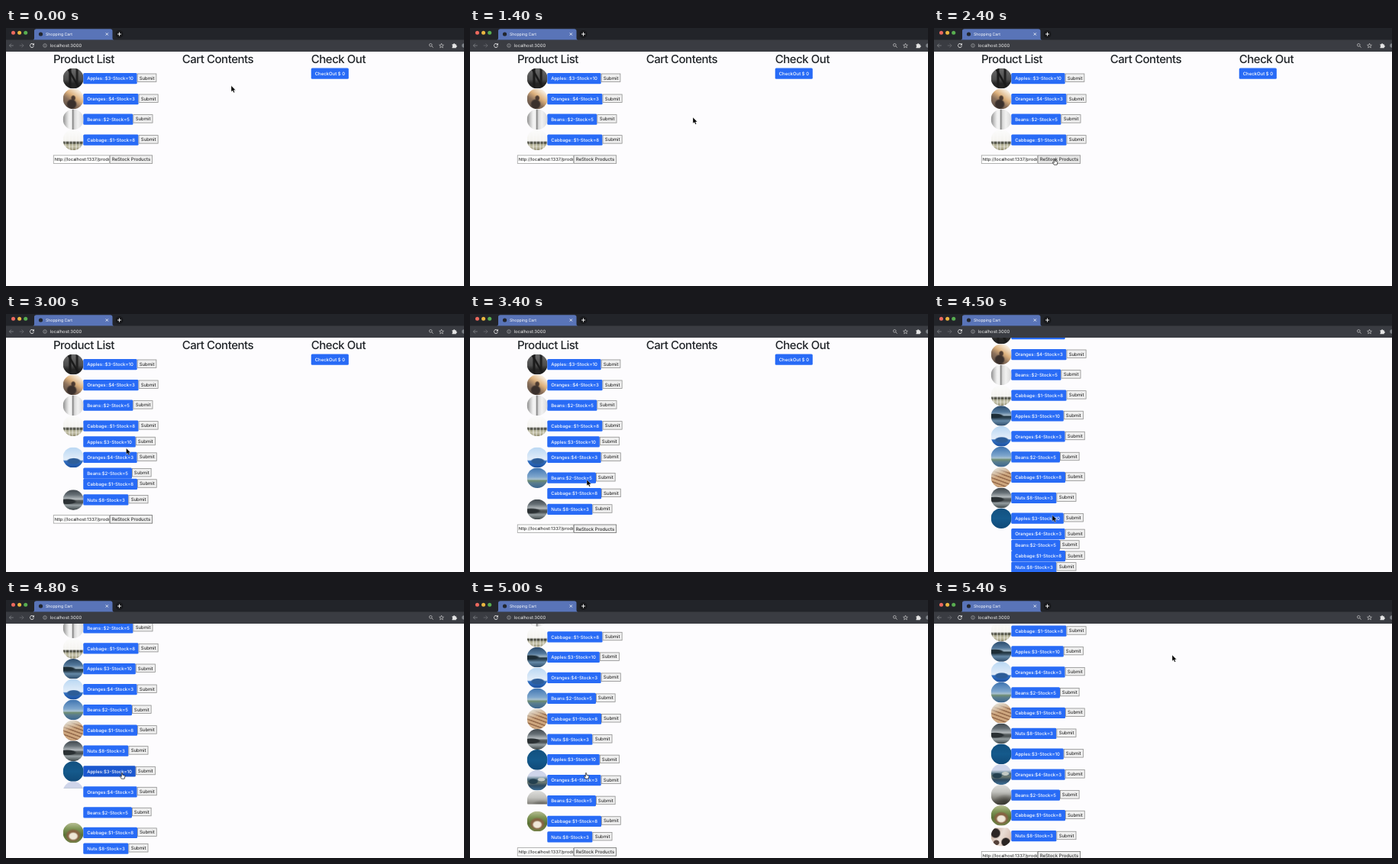
Recreate the animation shown at these times as an HTML page. Size 600x338 px, loop 5.5 s.

```html
<!DOCTYPE html>
<html lang="en">
<head>
<meta charset="utf-8">
<title>Shopping Cart</title>
<style>
  html, body { margin: 0; width: 100%; height: 100%; overflow: hidden; }
  body { position: relative; background: #fdfcfe; }
  #view { position: absolute; left: 0; top: 31px; width: 600px; height: 307px; overflow: hidden; }
  /* the page is laid out at full size and shown at 37.5% */
  #page { position: absolute; left: 0; top: -31px; width: 1600px; height: 1400px; transform-origin: 0 0;
    font: 16px/1 Inter, "Open Sans", sans-serif; color: #212529; white-space: nowrap; text-rendering: geometricPrecision; }
  h1 { position: absolute; top: 85px; margin: 0; font-size: 40px; line-height: 48px; font-weight: 500; letter-spacing: -1.25px; }
  .row { position: absolute; left: 199px; padding-left: 71px; display: flex; align-items: center; }
  .photo { position: absolute; left: 0; top: 0; width: 71.5px; height: 71.5px; border-radius: 50%; }
  .buy { height: 38px; line-height: 38px; padding: 0 13px; border-radius: 4px; background: #286bf6; color: #fff; font-weight: 500; }
  .buy.hover { background: #1b57cf; }
  .gray { box-sizing: border-box; height: 30px; line-height: 26px; padding: 0 6px; border: 2px solid #8a8a8a; background: #efefef; color: #111; }
  .row .gray { position: relative; top: -2px; }
  #checkout { position: absolute; left: 1066px; top: 140px; }
  #form { position: absolute; left: 165px; display: flex; }
  #url { box-sizing: border-box; width: 197px; height: 30px; line-height: 26px; padding-left: 2px; border: 2px solid #999; background: #fff; color: #111; font-size: 15.4px; overflow: hidden; }
  #restock.hover { background: #e5e5e5; }
  #restock.focus { border-color: #666; }
  svg { position: absolute; left: 0; top: 0; }
  svg text { font-family: Inter, "Open Sans", sans-serif; text-rendering: geometricPrecision; }
</style>
</head>
<body>
<div id="view">
  <div id="page">
    <h1 style="left:165px">Product List</h1>
    <h1 style="left:615px">Cart Contents</h1>
    <h1 style="left:1066px">Check Out</h1>
    <div id="checkout" class="buy">CheckOut $ 0</div>
    <div id="form">
      <div id="url">http://localhost:1337/products</div>
      <div id="restock" class="gray">ReStock Products</div>
    </div>
  </div>
</div>

<svg width="600" height="338" viewBox="0 0 600 338" fill="none">
  <!-- tab strip -->
  <path fill="#222429" d="M0 0H600V16H0Z"/>
  <path fill="#3a3c42" d="M0 15.4H600V31H0Z"/>
  <circle cx="9.5" cy="6.2" r="2.5" fill="#ec695e"/>
  <circle cx="17.6" cy="6.2" r="2.5" fill="#eab640"/>
  <circle cx="25.7" cy="6.2" r="2.5" fill="#58ae50"/>
  <path fill="#5974b8" d="M35 15.5Q37 15.5 37 13.5V4Q37 1.2 40 1.2H136.5Q139.5 1.2 139.5 4V13.5Q139.5 15.5 141.5 15.5Z"/>
  <circle cx="45.5" cy="8" r="2.6" fill="#22262e"/>
  <text x="52" y="10" font-size="5.15" fill="#fff">Shopping Cart</text>
  <path stroke="#fff" stroke-width=".8" d="M130.7 6.4l3.2 3.2m0-3.2l-3.2 3.2"/>
  <circle cx="148.5" cy="8" r="5" fill="#18191c"/>
  <path stroke="#fff" stroke-width=".9" d="M146 8h5m-2.5-2.5v5"/>
  <!-- toolbar -->
  <path stroke="#85878b" stroke-width=".8" d="M9.8 23H4.4m2.5-2.5L4.4 23l2.5 2.5"/>
  <path stroke="#6b6d71" stroke-width=".8" d="M17.7 23h5.4m-2.5-2.5l2.5 2.5-2.5 2.5"/>
  <path stroke="#eee" stroke-width=".9" d="M35.9 21.4a2.5 2.5 0 1 0 .5 2.2"/>
  <path fill="#eee" d="M36.9 19.8v2.7h-2.7z"/>
  <circle cx="51" cy="23" r="2.3" stroke="#b5b7bb" stroke-width=".6"/>
  <path stroke="#b5b7bb" stroke-width=".6" d="M51 22.7v1.5m0-2.7v.6"/>
  <text x="57.5" y="25.1" font-size="5.9" fill="#f1f1f1">localhost:3000</text>
  <circle cx="556.3" cy="22.3" r="1.8" stroke="#ccc" stroke-width=".7"/>
  <path stroke="#ccc" stroke-width=".8" d="M557.6 23.6l2 2"/>
  <path stroke="#ddd" stroke-width=".6" d="M570.5 20.2l.8 2 2.1.1-1.6 1.4.5 2.1-1.8-1.2-1.8 1.2.5-2.1-1.6-1.4 2.1-.1z"/>
  <path fill="#e4e4e4" d="M584.5 21.3h1.5a1.1 1.1 0 0 1 2.2 0h1.5v1.5a1.1 1.1 0 0 1 0 2.2v1.3h-5.2v-1.5a1.1 1.1 0 0 0 0-2z"/>
  <circle cx="600" cy="23" r="2.8" fill="#7d8187"/>
  <!-- pointer, drawn with its tip at 0,0 -->
  <g id="cursor" stroke-linejoin="round">
    <path id="arrow" fill="#000" stroke="#fff" stroke-width=".4" d="M0 0V8L1.9 6.4 3.2 9.3 4.6 8.7 3.4 5.9H5.8Z"/>
    <path id="hand" fill="#fff" stroke="#111" stroke-width=".7" d="M-.7.8Q0-.3.7.8V3.2L3.4 3.9Q4 4.2 3.8 5.2L3.2 8.2H-.7L-2.6 5.3Q-2.7 4.4-1.7 4.7L-.7 5.6Z"/>
  </g>
</svg>

<script>
const LOOP = 5500, STEP = 100;
const ZOOM = .375, TOP = 140.3, TALL = 71.6, SHORT = 38.4;
const FIRST_ADD = 2600, SECOND_ADD = 4300;

const down = stops => `linear-gradient(${stops})`;
const across = stops => `linear-gradient(90deg,${stops})`;
const blob = (size, at, color) => `radial-gradient(${size} at ${at},${color} 75%,#0000)`;
const layers = (...list) => list.join();

const photos = {
  trees: layers(
    "linear-gradient(60deg,#0000 46%,#1a1a1a 49% 53%,#0000 56%)",
    across("#0000 25%,#1c1c1c 32% 37%,#0000 44% 60%,#202020 66% 70%,#0000 78%"),
    down("#6a6a6a,#4d4d4d 55%,#252525 75%")),
  sunset: layers(
    blob("26% 26%", "42% 76%", "#3a302c"), blob("12% 14%", "50% 46%", "#4d3b31"),
    "linear-gradient(215deg,#f6e8d5 18%,#dcb07c 42%,#8b715c 62%,#4b423e)"),
  wall: across("#8d8d8d,#cfcfcf 18%,#f2f2f2 30% 42%,#858585 48%,#d9d9d9 56%,#f1f1f1 72%,#d8d8d8"),
  field: layers(
    "repeating-linear-gradient(90deg,#fff0 0 7px,#fbfafa66 8px 12px)",
    down("#fcfcfc,#f4f3ef 54%,#4a4b40 62% 66%,#a7a58a 72%,#c9c6ae 82%,#8c8769")),
  lake: layers(
    blob("45% 12%", "18% 50%", "#1d2d36"),
    down("#2a4a6b,#54799c 32%,#a0b7c7 47%,#233742 53%,#32495a 62%,#6488a6 74%,#2c4a68")),
  peak: layers(
    blob("36% 16%", "52% 68%", "#2d5d98"),
    down("#b9d7f3,#e4eef9 62%,#3270c2 68%,#1b4f9d")),
  turbines: down("#3f74b0,#7ea6cd 45%,#a6c0cf 56%,#6f8d74 64%,#587c8f 76%,#3c668f"),
  benches: layers(
    "linear-gradient(160deg,#e0d8ca 15%,#e0d8ca00 45%)",
    "repeating-linear-gradient(20deg,#cda67e 0 6px,#94694a 8px 10px,#cda67e 12px)"),
  storm: layers(
    blob("48% 14%", "20% 58%", "#2a3033"),
    down("#3f474d,#666f75 25%,#b4babd 46%,#5a6062 54%,#4a5153 64%,#949da0 76%,#3c4547")),
  deep: down("#12507f,#155a8c 50%,#104a78"),
  coast: layers(
    blob("26% 14%", "30% 56%", "#24404f"), blob("20% 10%", "70% 46%", "#c3c9c4"),
    down("#cfd5ea 28%,#9db0be 36%,#4c6a7c 46%,#6f7b72 60%,#2e4a60 76%,#3d6f98")),
  fog: layers(
    "radial-gradient(60% 45% at 70% 90%,#3b3a34,#3b3a3400)",
    down("#dededc,#c2c2be 35%,#8b8a84 62%,#55534d 85%,#403e38")),
  basket: layers(
    blob("24% 20%", "50% 66%", "#efe7d8"), blob("38% 32%", "50% 62%", "#866343"),
    down("#b9bf95,#7f9556 30%,#5a7236 60%,#768248")),
  crowd: layers(
    down("#fff 8%,#fff0 12%"),
    blob("26% 26%", "22% 36%", "#2b2524"), blob("24% 24%", "72% 80%", "#2b2524"), blob("16% 14%", "26% 82%", "#54413a"),
    "linear-gradient(115deg,#b79a8a,#eaded6 50%,#cdb0a2)"),
};

// label, photo, time shown, time the photo arrives, time it takes to fill in
const items = [
  ["Apples::$3-Stock=10", "trees", 0, 0],
  ["Oranges::$4-Stock=3", "sunset", 0, 0],
  ["Beans::$2-Stock=5", "wall", 0, 0],
  ["Cabbage::$1-Stock=8", "field", 0, 0],
  ["Apples:$3-Stock=10", "lake", FIRST_ADD, 3600],
  ["Oranges:$4-Stock=3", "peak", FIRST_ADD, 2900],
  ["Beans:$2-Stock=5", "turbines", FIRST_ADD, 3200],
  ["Cabbage:$1-Stock=8", "benches", FIRST_ADD, 3700],
  ["Nuts:$8-Stock=3", "storm", FIRST_ADD, 3000],
  ["Apples:$3-Stock=10", "deep", SECOND_ADD, 4500],
  ["Oranges:$4-Stock=3", "coast", SECOND_ADD, 4700, 300],
  ["Beans:$2-Stock=5", "fog", SECOND_ADD, 4800, 300],
  ["Cabbage:$1-Stock=8", "basket", SECOND_ADD, 4800],
  ["Nuts:$8-Stock=3", "crowd", SECOND_ADD, 5100],
];

// time, x, y of the pointer tip
const pointerPath = [
  [0, 295, 75.5], [500, 295, 76], [1400, 292, 117], [1600, 292, 117],
  [2200, 158, 171], [2900, 158, 171], [3400, 153, 217], [4000, 158, 301],
  [4300, 158, 301], [4700, 152, 226], [5000, 152, 226], [5400, 312, 72],
];
const scrollPath = [[0, 0], [4400, 0], [4500, 40], [4800, 83.2], [5100, 105.9]];
const handTimes = [[2100, 2700], [4200, 4300], [4600, 5000]];

const $ = id => document.getElementById(id);
const clamp = v => Math.max(0, Math.min(1, v));
const smooth = v => v * v * (3 - 2 * v);
const linear = v => v;

function along(path, t, ease) {
  const i = path.findIndex(key => key[0] > t);
  if (i < 0) return path[path.length - 1].slice(1);
  const a = path[i - 1], b = path[i];
  const k = ease((t - a[0]) / (b[0] - a[0]));
  return a.slice(1).map((v, n) => v + (b[n + 1] - v) * k);
}

function add(parent, className, text = "") {
  const el = document.createElement("div");
  el.className = className;
  el.textContent = text;
  parent.append(el);
  return el;
}

const rows = items.map(([label, picture, shown, loaded, fill = 0]) => {
  const el = add($("page"), "row");
  const photo = add(el, "photo");
  photo.style.background = photos[picture];
  const buy = add(el, "buy", label);
  add(el, "gray", "Submit");
  return { el, photo, buy, shown, loaded, fill };
});

function draw(t) {
  const [x, y] = along(pointerPath, t, smooth);
  const [scroll] = along(scrollPath, t, linear);
  const hand = handTimes.some(([from, to]) => t >= from && t <= to);
  const pageX = x / ZOOM, pageY = (y + scroll) / ZOOM;
  let top = TOP;

  for (const { el, photo, buy, shown, loaded, fill } of rows) {
    const visible = t >= shown, ready = t >= loaded;
    el.style.display = visible ? "flex" : "none";
    if (!visible) continue;
    const height = ready ? TALL : SHORT;
    const part = fill ? clamp((t - loaded) / fill) : 1;
    el.style.top = top + "px";
    el.style.height = height + "px";
    photo.style.display = ready ? "block" : "none";
    photo.style.clipPath = `inset(0 0 ${(1 - part) * 100}% 0)`;
    const near = Math.abs(pageY - top - height / 2) < 19;
    buy.classList.toggle("hover", hand && near && pageX > 270 && pageX < 450);
    top += height;
  }

  const formTop = top + 17;
  $("form").style.top = formTop + "px";
  const over = pageX > 363 && pageX < 515 && pageY > formTop - 3 && pageY < formTop + 30;
  $("restock").classList.toggle("hover", over);
  $("restock").classList.toggle("focus", t >= FIRST_ADD);

  $("page").style.transform = `translateY(${-scroll}px) scale(${ZOOM})`;
  $("cursor").setAttribute("transform", `translate(${x} ${y})`);
  $("hand").style.display = hand ? "" : "none";
  $("arrow").style.display = hand ? "none" : "";
}

function tick() {
  draw(Math.floor(performance.now() % LOOP / STEP) * STEP);
  requestAnimationFrame(tick);
}
tick();
</script>
</body>
</html>
```
